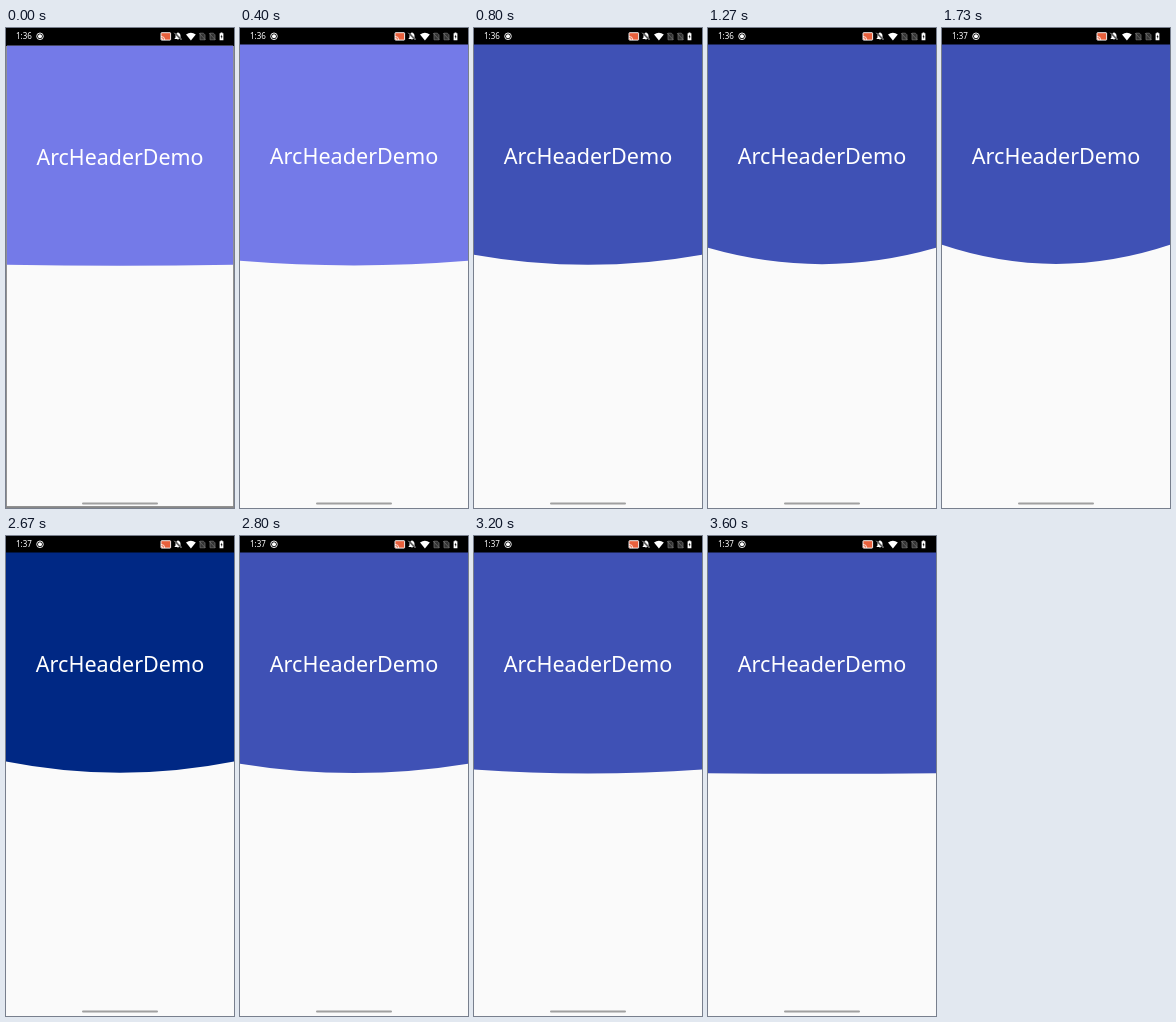
Write an HTML page that moves like this. It is 228 px wide and 480 px high and loops after 3.67 s.

```html
<!DOCTYPE html>
<html lang="en">
<head>
<meta charset="utf-8">
<title>Arc header</title>
<style>
  html, body { margin: 0; height: 100%; overflow: hidden; background: #888; }
  svg { display: block; width: 228px; height: 480px; }
  text { font-family: "Noto Sans", "Open Sans", sans-serif; fill: #fff; }
</style>
</head>
<body>
<svg viewBox="0 0 228 480">
  <rect width="228" height="480" fill="#888"/>
  <rect width="228" height="18"/>
  <g id="app">
    <rect y="16" width="228" height="464" fill="#fafafa"/>
    <path id="header"/>
    <text x="114" y="136" font-size="21.6" text-anchor="middle">ArcHeaderDemo</text>
  </g>
  <rect width="228" height="16.5"/>
  <text id="clock" x="10" y="11.2" font-size="8"></text>
  <g fill="#fff">
    <circle cx="34" cy="8.3" r="3.3" fill="none" stroke="#fff" stroke-width=".9"/>
    <circle cx="34" cy="8.3" r="2"/>
    <rect x="155" y="4.7" width="9.6" height="7.4" rx=".6" fill="#e8603c" stroke="#fff" stroke-width=".9"/>
    <path d="M155 8.4q3.8 0 3.8 3.7M155 10.2q1.9 0 1.9 1.9" fill="none" stroke="#fff" stroke-width=".8"/>
    <path d="M168.6 11v-.6l.9-.9v-2q0-2.2 1.9-2.6 0-.7.6-.7t.6.7q1.9.4 1.9 2.6v2l.9.9v.6zM171.2 11.4h1.6q-.8 1.4-1.6 0z"/>
    <path d="M168.5 4.8l7 7.2" stroke="#000" stroke-width="1.6"/>
    <path d="M168.3 4.8l7.2 7.2" stroke="#fff" stroke-width=".7"/>
    <path d="M180 6.6q4.9-3.6 9.8 0l-4.9 5.8z"/>
    <g id="sim" fill="#333" stroke="#777" stroke-width=".7">
      <path d="M194 5.2h3.4l1.6 1.6v5h-5z"/>
      <path d="M193 5l6.5 7"/>
    </g>
    <use href="#sim" x="10"/>
    <path d="M213.6 5.3h1v-.9h1.8v.9h1v6.9h-3.8z"/>
    <path d="M215.8 6.6l-1.2 2.4h.8v1.9l1.2-2.5h-.8z" fill="#000"/>
  </g>
  <rect x="76" y="474.6" width="76" height="2" rx="1" fill="#a0a0a0"/>
</svg>
<script>
  const LOOP = 3670, FPS = 15, LAST = 54;
  const COLORS = ["#747ae8", "#3f51b5", "#002884", "#3f51b5"];
  const [app, header, clock] = ["app", "header", "clock"].map(id => document.getElementById(id));

  function draw(now) {
    const step = Math.min(LAST, Math.floor((now % LOOP) * FPS / 1000 + 0.1));
    const time = step * 1000 / FPS;

    // Eases up for 2 s and back down for 2 s; the colour changes every second.
    const bend = (1 - Math.cos(Math.PI * (time + 230) / 2000)) / 2;
    const side = 237.5 - 20.7 * bend;
    const middle = 237.9 - 2 * bend;
    header.setAttribute("d", `M0 16H228V${side}Q114 ${2 * middle - side} 0 ${side}Z`);
    header.setAttribute("fill", COLORS[Math.floor((time + 230) / 1000)]);

    // The window settles to full size just after opening.
    const scale = step ? 1 : 0.992;
    app.setAttribute("transform", `translate(114 240) scale(${scale}) translate(-114 -240)`);
    clock.textContent = time < 1360 ? "1:36" : "1:37";
  }

  const start = performance.now();
  function tick() {
    draw(performance.now() - start);
    requestAnimationFrame(tick);
  }
  tick();
</script>
</body>
</html>
```
